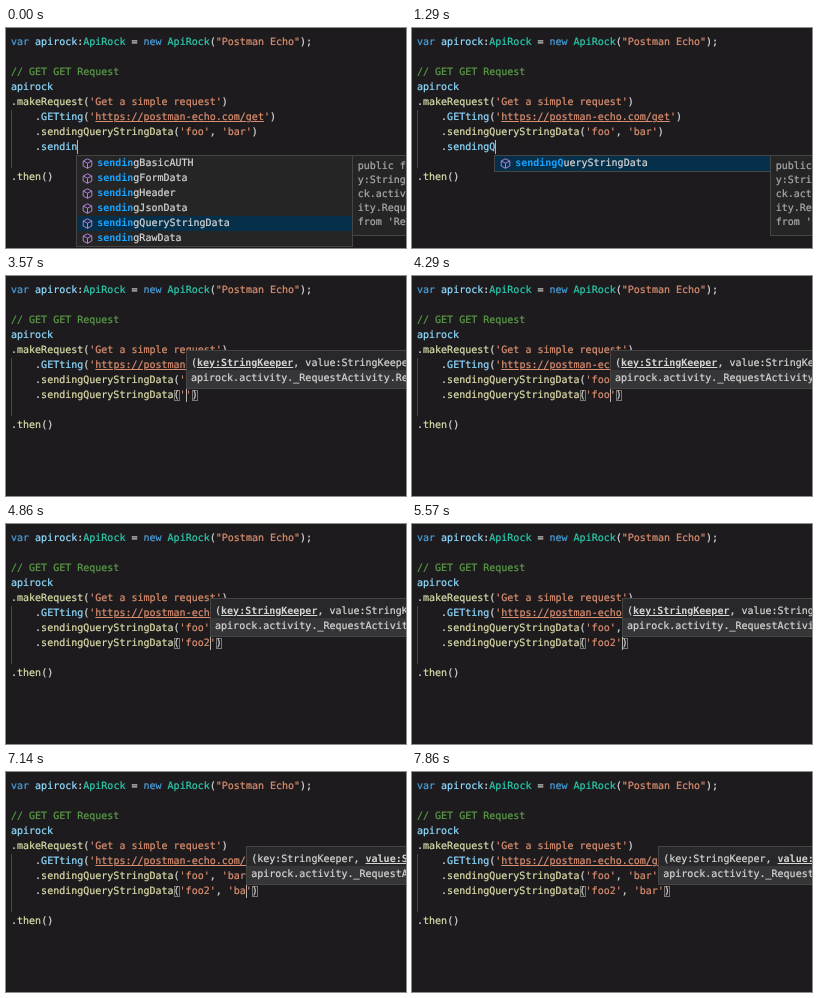
These frames come from a looping animation (400 px wide and 220 px high, 8000 ms). An HTML page:

```html
<!DOCTYPE html>
<html lang="en">
<head>
<meta charset="utf-8">
<title>Code completion</title>
<style>
  html, body { margin: 0; width: 100%; height: 100%; overflow: hidden; background: #1d1b1e; }
  #stage {
    position: relative; width: 400px; height: 220px; overflow: hidden;
    background: #1d1b1e; color: #d6d6d6;
    font: 10px/15px "DejaVu Sans Mono", "Liberation Mono", monospace;
    text-rendering: geometricPrecision; font-variant-ligatures: none;
    -webkit-text-stroke: .22px;
  }
  #stage div { position: absolute; white-space: pre; box-sizing: border-box; }
  .k { color: #4a9fdc; } .v { color: #8fdcff; } .t { color: #2cc9ae; }
  .s { color: #d98e70; } .c { color: #5b9a48; } .f { color: #dcdca8; }
  .u { color: #d98e70; text-decoration: underline 1px; text-underline-offset: 1px; }
  .p { box-shadow: inset 0 0 0 1px #777; }
  .guide { left: 5px; top: 82px; width: 1px; height: 58px; background: #48474a; }
  #caret { top: 112px; width: 1px; height: 14px; background: #b4b4b0; }
  #list, #docs, #hint { background: #252526; border: 1px solid #454545; overflow: hidden; }
  #list { top: 127px; width: 277px; }
  #list .item { left: 0; width: 100%; height: 15px; padding-left: 20px; }
  #list .on { background: #062f4a; }
  #list b { color: #18a3ff; }
  #list svg { position: absolute; left: 5px; top: 2px; }
  #docs { top: 127px; width: 140px; height: 81px; padding: 4px 4.5px; line-height: 14px; color: #a9a9a9; }
  #hint {
    top: 74px; width: 280px; height: 39px; padding: 4.5px 3.8px;
    background: linear-gradient(#28272a 50%, #363538 50%);
  }
  #hint b { text-decoration: underline 1px; text-underline-offset: 1px; }
  b { -webkit-text-stroke: 0; }
</style>
</head>
<body>
<div id="stage">
  <div class="guide"></div>
  <div id="code"></div>
  <div id="caret"></div>
  <div id="list"></div>
  <div id="docs">public f
y:String
ck.activ
ity.Requ
from 'Re</div>
  <div id="hint"></div>
</div>
<script>
const LOOP = 8000, CHAR = 6.02, LEFT = 5, TOP = 7, ROW = 14.98, EDIT_ROW = 7;
const METHOD = 'sendingQueryStringData';
const METHODS = ['sendingBasicAUTH', 'sendingFormData', 'sendingHeader',
  'sendingJsonData', METHOD, 'sendingRawData'];

const $ = id => document.getElementById(id);
const span = (cls, text) => `<span class="${cls}">${text}</span>`;

// rows of [class, text] pairs, keyed by line index
const lines = {
  0: [['k', 'var '], ['v', 'apirock'], ['', ':'], ['t', 'ApiRock'], ['', ' = '], ['k', 'new '],
      ['t', 'ApiRock'], ['', '('], ['s', '"Postman Echo"'], ['', ');']],
  2: [['c', '// GET GET Request']],
  3: [['v', 'apirock']],
  4: [['', '.'], ['f', 'makeRequest'], ['', '('], ['s', "'Get a simple request'"], ['', ')']],
  5: [['', '    .'], ['v', 'GETting'], ['', '('], ['s', "'"],
      ['u', 'https://postman-echo.com/get'], ['s', "'"], ['', ')']],
  6: [['', '    .'], ['f', METHOD], ['', '('], ['s', "'foo'"], ['', ', '], ['s', "'bar'"], ['', ')']],
  9: [['', '.'], ['f', 'then'], ['', '()']]
};

// time, method name typed so far, arguments before the caret (null: no brackets yet)
const steps = [
  [0, 'sendin', null],
  [570, 'sending', null],
  [1000, 'sendingQ', null],
  [1710, METHOD, null],
  [2290, METHOD, ''],
  [3290, METHOD, "'"],
  [3860, METHOD, "'f"],
  [4000, METHOD, "'fo"],
  [4290, METHOD, "'foo"],
  [4570, METHOD, "'foo2"],
  [5140, METHOD, "'foo2'"],
  [5860, METHOD, "'foo2',"],
  [6290, METHOD, "'foo2', "],
  [6710, METHOD, "'foo2', '"],
  [6860, METHOD, "'foo2', 'b"],
  [7000, METHOD, "'foo2', 'ba"],
  [7290, METHOD, "'foo2', 'bar"]
];

const rowHtml = (i, html) =>
  `<div style="left:${LEFT}px;top:${TOP + ROW * i}px">${html}</div>`;

const fixed = Object.entries(lines)
  .map(([i, parts]) => rowHtml(+i, parts.map(p => span(...p)).join(''))).join('');

const cube = `<svg width="11" height="11" viewBox="0 0 11 11" fill="none" stroke="#b180d7">
  <path d="M5.5 .8L9.8 3V8L5.5 10.3L1.2 8V3ZM1.2 3L5.5 5.2L9.8 3M5.5 5.2V10.3"/></svg>`;

function editRow(name, args) {
  if (args === null) return '    .' + span('v', name);
  const open = args.split("'").length % 2 === 0;
  const text = (args + (open ? "'" : '')).replace(/'[^']*'/g, m => span('s', m));
  return '    .' + span('f', name) + span('p', '(') + text + span('p', ')');
}

function drawList(name, x) {
  const items = METHODS.filter(m => m.startsWith(name));
  $('list').style.left = x - 1 + 'px';
  $('list').style.height = items.length * 15 + 2 + 'px';
  $('list').innerHTML = items.map((m, i) =>
    `<div class="item${m === METHOD ? ' on' : ''}" style="top:${i * 14.9}px">` +
    `${cube}<b>${name}</b>${m.slice(name.length)}</div>`).join('');
  $('docs').style.left = x + 275 + 'px';
}

function drawHint(args, x) {
  const active = args.includes(',') ? 1 : 0;
  const params = ['key:StringKeeper', 'value:StringKeeper']
    .map((p, i) => i === active ? `<b>${p}</b>` : p);
  $('hint').style.left = x + 0.6 + 'px';
  $('hint').innerHTML = `(${params.join(', ')}):\napirock.activity._RequestActivity.RequestActivity`;
}

function show(id, on) { $(id).style.display = on ? 'block' : 'none'; }

function draw([, name, args]) {
  const col = 5 + name.length + (args === null ? 0 : 1 + args.length);
  const x = LEFT + col * CHAR;
  const listing = name !== METHOD, hinting = args !== null;
  $('code').innerHTML = fixed + rowHtml(EDIT_ROW, editRow(name, args));
  $('caret').style.left = x + 'px';
  show('list', listing);
  show('docs', listing);
  show('hint', hinting);
  if (listing) drawList(name, x);
  if (hinting) drawHint(args, x);
}

let last = null;
const start = performance.now();

function frame() {
  const t = (performance.now() - start) % LOOP;
  const step = steps.filter(s => s[0] <= t).pop();
  if (step !== last) draw(last = step);
  // the caret blinks from the latest key press
  const since = t - (step[0] || -290);
  show('caret', since % 1000 < 500);
  requestAnimationFrame(frame);
}
frame();
</script>
</body>
</html>
```
